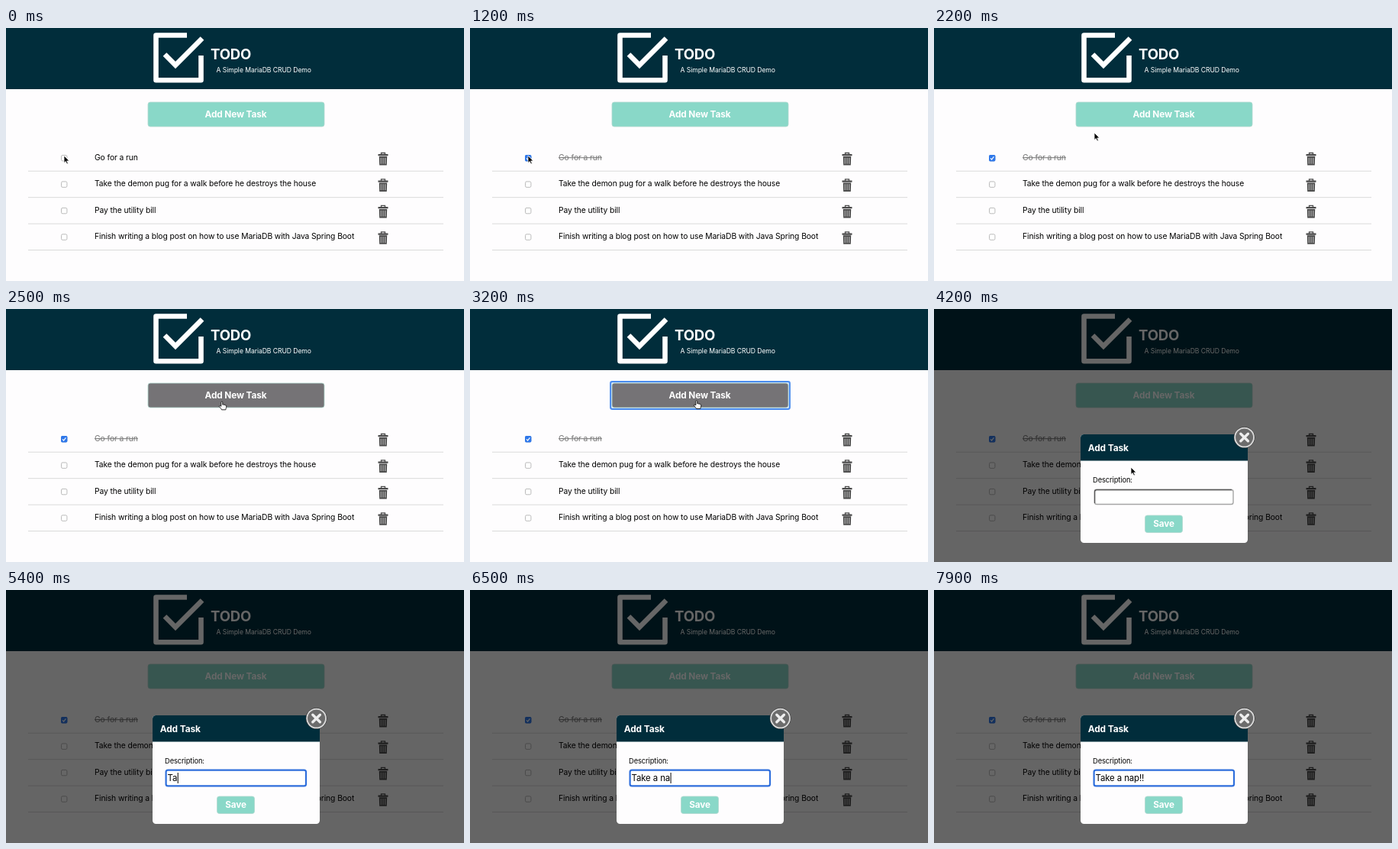
Recreate the animation shown at these times as an HTML page. Size 600 by 331 pixels, loop 8000 ms.

```html
<!DOCTYPE html>
<html lang="en">
<meta charset="utf-8">
<title>Todo list</title>
<style>
  html, body { margin: 0; width: 100%; height: 100%; overflow: hidden; background: #fefdfe; }
  svg { display: block; width: 600px; height: 331px; }
  text { font-family: Inter, "Open Sans", sans-serif; letter-spacing: -.009em; white-space: pre; }
  .bold { font-weight: 700; fill: #fff; }
  .task { font-size: 10.3px; }
  .done { fill: #777; text-decoration: line-through; }
  .button { stroke: #b2d8d0; stroke-width: .8; }
  .hidden { display: none; }
</style>
<svg viewBox="0 0 600 331">
  <defs>
    <g id="trash">
      <path d="M-2.5 -5.7V-7.8H2.5V-5.7" fill="none" stroke="#484848" stroke-width="1.3"/>
      <path d="M-6.5 -6.2H6.5V-4H-6.5ZM-5.2 -3.3H5.2L4.8 8.2H-4.8Z" fill="#484848"/>
      <path d="M-2.8 -1.6V6.5M0 -1.6V6.5M2.8 -1.6V6.5" stroke="#d2d2d2" stroke-width="1"/>
    </g>
  </defs>

  <rect width="600" height="331" fill="#fefdfe"/>
  <rect width="600" height="80" fill="#012d3b"/>
  <g fill="none" stroke="#fff" stroke-width="6.6">
    <path d="M255.5 36V68.3H196.5V9.5H237" stroke-linejoin="round"/>
    <path d="M208 34.5L222 48.5L257 13.5"/>
  </g>
  <text class="bold" x="268" y="41.4" font-size="18.6">TODO</text>
  <text x="275.5" y="57.5" font-size="8.65" fill="#fff">A Simple MariaDB CRUD Demo</text>

  <rect id="ring" x="184.2" y="95.2" width="234.6" height="35.6" rx="2" fill="#fff" stroke="#4a8cee" stroke-width="2.2"/>
  <rect id="add" class="button" x="186" y="97" width="231" height="32" rx="3"/>
  <text class="bold" x="301" y="117.2" font-size="11.8" text-anchor="middle">Add New Task</text>

  <g id="rows"></g>

  <g id="modal">
    <rect width="600" height="331" opacity=".6"/>
    <rect x="192" y="164" width="219" height="142" rx="4.5" fill="#fefdfe"/>
    <path d="M192 198.5V168.5a4.5 4.5 0 0 1 4.5 -4.5H406.5a4.5 4.5 0 0 1 4.5 4.5V198.5Z" fill="#012d3b"/>
    <text class="bold" x="201.7" y="186" font-size="11.9">Add Task</text>
    <g transform="translate(406.6 168)">
      <circle r="13.5" fill="#6c6c6c" stroke="#333" stroke-width="1"/>
      <circle r="12.4" fill="none" stroke="#dcdcdc" stroke-width="1.8"/>
      <path d="M-4.8 -4.8L4.8 4.8M4.8 -4.8L-4.8 4.8" stroke="#eee" stroke-width="3.4" stroke-linecap="round"/>
    </g>
    <text x="208" y="227" font-size="9.3">Description:</text>
    <rect x="210.5" y="236.5" width="181.5" height="19" rx="2.5" fill="#fff" stroke="#a5a5a5" stroke-width="1.4"/>
    <path d="M210.5 254V239a2.5 2.5 0 0 1 2.5 -2.5H390" fill="none" stroke="#555" stroke-width="1.4"/>
    <rect id="focus" x="209.6" y="235.6" width="183.4" height="20.8" rx="2.5" fill="#fff" stroke="#2f6fdc" stroke-width="2.2"/>
    <text id="input" x="211.5" y="250" font-size="11.4"></text>
    <rect id="caret" y="239" width="1" height="14"/>
    <rect class="button" x="276.5" y="270" width="49" height="22.5" rx="3" fill="#89d8c8"/>
    <text class="bold" x="301" y="285.4" font-size="11.7" text-anchor="middle">Save</text>
  </g>

  <g id="cursor">
    <path id="arrow" d="M0 0V9.5L2.2 7.5L3.8 11L5.4 10.3L3.8 6.9H6.9Z" stroke="#fff" stroke-width=".8"/>
    <path id="hand" d="M-1.2 6V.7C-1.2 -.6 .8 -.6 .8 .7V4C1.2 3.2 2.5 3.4 2.6 4.3C3.2 3.6 4.2 4 4.3 4.8C5 4.4 5.7 4.8 5.7 5.7C5.8 8 5 8.6 4.8 10.5H-.5C-1 9 -2.7 7.6 -3.6 6.2C-4 5.2 -2.7 4.7 -1.2 6Z"
      fill="#fff" stroke="#111" stroke-width=".9"/>
    <path id="beam" d="M-2 -5Q0 -5 0 -4Q0 -5 2 -5M0 -4V4M-2 5Q0 5 0 4Q0 5 2 5" fill="none" stroke="#222" stroke-width=".9"/>
  </g>
</svg>
<script>
const LOOP = 8000, STEP = 100;
const CHECKED = 900, STRUCK = 1000, HOVER = 2300, PRESS = 3000, OPEN = 3300, BEAM = 4500, FOCUS = 4700, HIDE = 5000;
const message = "Take a nap!!";
const keyTimes = [5200, 5300, 5600, 5800, 6000, 6100, 6300, 6400, 6500, 7000, 7200, 7400];
// time, x, y
const path = [
  [0, 76, 167], [1500, 76, 167], [1700, 92, 165], [2000, 155, 152], [2200, 210, 137],
  [2300, 246, 128], [2400, 276, 122], [2700, 297, 120], [3800, 297, 120],
  [4000, 284, 154], [4200, 258, 207], [4500, 250, 240], [4700, 248, 246], [LOOP, 248, 246]
];
const tasks = [
  "Go for a run",
  "Take the demon pug for a walk before he destroys the house",
  "Pay the utility bill",
  "Finish writing a blog post on how to use MariaDB with Java Spring Boot"
];

const $ = id => document.getElementById(id);
const show = (id, on) => $(id).classList.toggle("hidden", !on);

$("rows").innerHTML = tasks.map((task, i) => `
  <g transform="translate(0 ${i * 34.45})">
    <rect x="72.5" y="166.5" width="7.4" height="7.4" rx="1.6" fill="#fff" stroke="#b4b4b4" stroke-width=".9"/>
    <text class="task" x="116" y="173">${task}</text>
    <use href="#trash" x="494" y="171.3"/>
    <path d="M29 187.2H573" stroke="#dadada"/>
  </g>`).join("") +
  `<g id="tick"><rect x="72" y="166" width="8.4" height="8.4" rx="1.6" fill="#2f78ea"/>
   <path d="M74 170.3L75.6 172L78.4 168.3" fill="none" stroke="#fff" stroke-width="1.2"/></g>`;
const firstTask = document.querySelector(".task");

function cursorAt(t) {
  const i = path.findIndex(p => p[0] > t);
  const [t0, x0, y0] = path[i - 1], [t1, x1, y1] = path[i];
  const k = (t - t0) / (t1 - t0);
  return [x0 + (x1 - x0) * k, y0 + (y1 - y0) * k];
}

function draw(t) {
  show("tick", t >= CHECKED);
  firstTask.classList.toggle("done", t >= STRUCK);
  $("add").setAttribute("fill", t >= HOVER && t < OPEN ? "#757376" : "#89d8c8");
  show("ring", t >= PRESS && t < OPEN);
  show("modal", t >= OPEN);

  const typed = keyTimes.filter(k => k <= t);
  const lastKey = typed.length ? typed[typed.length - 1] : FOCUS;
  $("input").textContent = message.slice(0, typed.length);
  show("focus", t >= FOCUS);
  show("caret", t >= FOCUS && (t - lastKey) % 1000 < 500);
  const width = typed.length ? $("input").getComputedTextLength() : 0;
  $("caret").setAttribute("x", 212 + width);

  const hand = t >= HOVER && t < OPEN, beam = t >= BEAM;
  show("cursor", t < HIDE);
  show("hand", hand);
  show("beam", beam);
  show("arrow", !hand && !beam);
  $("cursor").setAttribute("transform", `translate(${cursorAt(t)})`);
}

function tick() {
  draw(Math.floor(performance.now() % LOOP / STEP) * STEP);
  requestAnimationFrame(tick);
}
tick();
</script>
</html>
```
